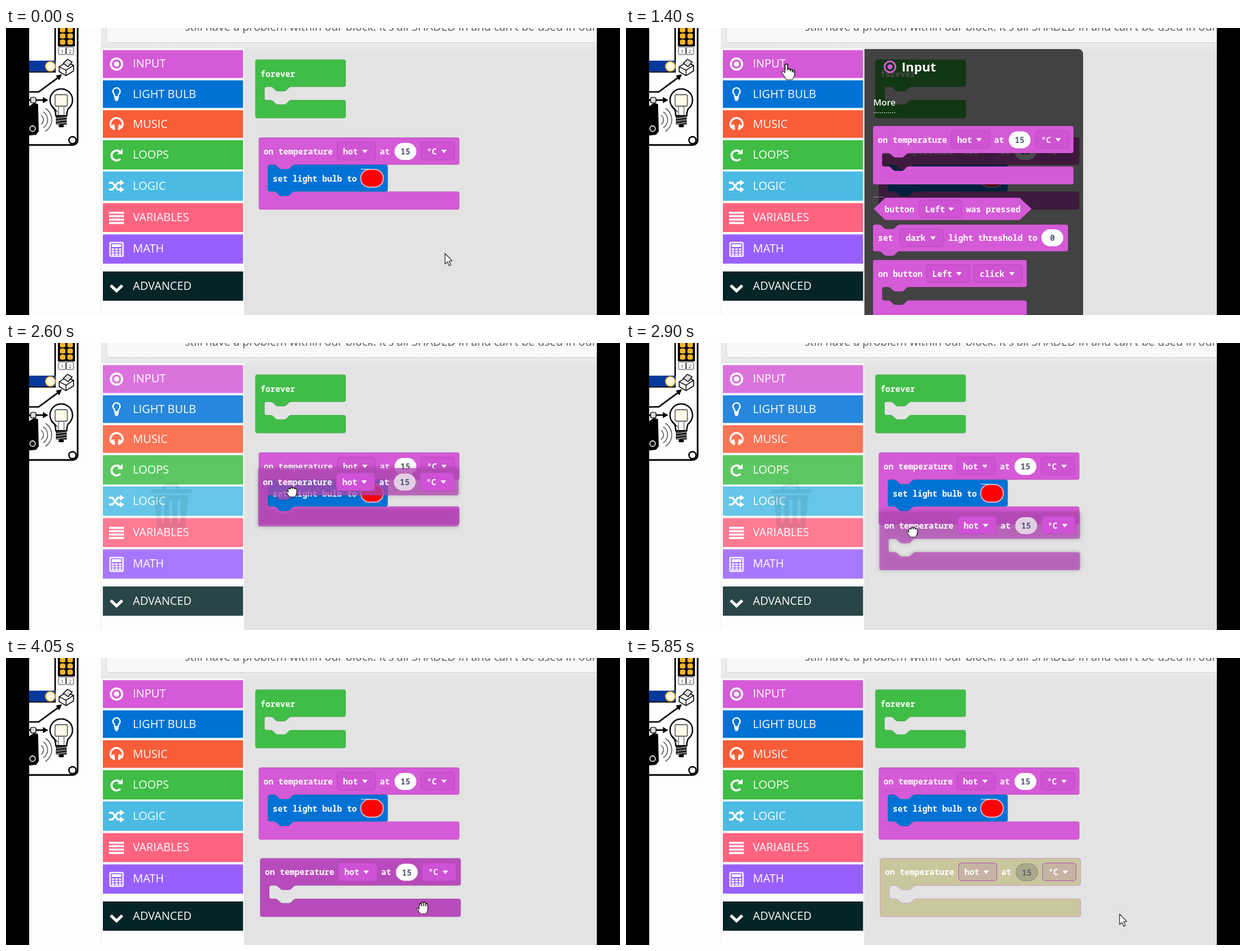
An HTML page with a canvas that plays this animation: 900 by 422 pixels, repeating every 7000 ms.

```html
<!DOCTYPE html>
<html lang="en">
<head>
<meta charset="utf-8">
<title>Block editor</title>
<style>
html, body { margin: 0; width: 100%; height: 100%; overflow: hidden; background: #000; }
canvas { display: block; width: 900px; height: 422px; }
</style>
</head>
<body>
<canvas id="stage" width="900" height="422"></canvas>
<script>
const g = document.getElementById('stage').getContext('2d');
const LOOP = 7000;
const SANS = '"Open Sans", "Noto Sans", sans-serif';
const MONO = 'bold 12.1px "Noto Sans Mono", "DejaVu Sans Mono", monospace';
const PINK = '#d55ad7', BLUE = '#0072d6', GREEN = '#3fbd46', RIM = 'rgba(0,0,0,.1)';

// Looks of an event block: body, field, field border, oval, oval text
const NORMAL = { body: PINK, rim: RIM, field: '#cf53d2', edge: '#bc4bc0', oval: '#fff', num: '#575e75' };
const HELD = { body: '#b84bbb', field: '#cf52d6', edge: '#c04cc6', oval: '#e3cfe4', num: '#575e75' };
const DROPPED = { ...HELD, rim: RIM, oval: '#fff' };
const OFF = { body: '#cac69d', rim: '#d0a9cb', field: '#c6b3a3', edge: '#b964bd', oval: '#aaa98a', num: '#66666c', ovalEdge: '#8f8e78' };

const ROWS = [
  ['INPUT', 32.5, 41, PINK, '#a02fa3'],
  ['LIGHT BULB', 77, 40.5, BLUE, '#004f9c'],
  ['MUSIC', 121, 40.5, '#f95c38', '#b02d15'],
  ['LOOPS', 165, 43, GREEN, '#268a2c'],
  ['LOGIC', 211, 43, '#4bbbe4', '#2390b8'],
  ['VARIABLES', 257.5, 42.5, '#ff6380', '#d02f50'],
  ['MATH', 303.5, 43, '#985fff', '#6a2be0'],
  ['ADVANCED', 358, 43, '#042428', '#021416']
];

// time, pointer kind, x, y
const POINTER = [
  [0, 'arrow', 643, 331], [250, 'arrow', 560, 306], [350, 'arrow', 448, 272], [450, 'arrow', 346, 242],
  [600, 'point', 298, 182], [700, 'point', 247, 117], [800, 'point', 240, 92], [900, 'point', 237, 72],
  [1000, 'point', 235, 60], [1100, 'point', 233, 53], [1850, 'point', 282, 78], [1950, 'point', 345, 116],
  [2050, 'point', 392, 150], [2150, 'grab', 409, 167], [2300, 'fist', 411, 171], [2400, 'fist', 414, 182],
  [2500, 'fist', 417, 199], [2600, 'fist', 419, 218], [2700, 'fist', 419, 239], [2800, 'fist', 419, 259],
  [2900, 'fist', 420, 277], [3000, 'fist', 420, 291], [3100, 'fist', 420, 303], [3200, 'fist', 420, 312],
  [3300, 'fist', 420, 316], [3650, 'grab', 420, 316], [3750, 'grab', 450, 328], [3850, 'grab', 505, 345],
  [3950, 'grab', 560, 358], [4050, 'grab', 611, 368], [4150, 'arrow', 665, 374], [4250, 'arrow', 715, 377],
  [4350, 'arrow', 742, 376], [4550, 'arrow', 738, 376], [4650, 'arrow', 729, 376], [4750, 'arrow', 723, 376]
];
const HOVER = [[0, -1], [600, 3], [700, 2], [800, 1], [900, 0], [1400, -1]];
const DRAG = [[2300, 363, 146], [2400, 365, 155], [2500, 367, 168], [2600, 369.5, 184], [2700, 370.5, 206], [2800, 371, 228],
  [2900, 371.5, 248], [3000, 372, 267], [3100, 372, 280], [3200, 372.5, 290], [3300, 372.5, 294.5]];

const at = (keys, t) => keys.reduce((last, k) => k[0] <= t ? k : last, keys[0]);

function rect(x, y, w, h, fill) { g.fillStyle = fill; g.fillRect(x, y, w, h); }
function paint(fill, edge, width = 1) {
  if (fill) { g.fillStyle = fill; g.fill(); }
  if (edge) { g.strokeStyle = edge; g.lineWidth = width; g.stroke(); }
}
function box(x, y, w, h, r, fill, edge, width) {
  g.beginPath(); g.roundRect(x, y, w, h, r); paint(fill, edge, width);
}
function disc(x, y, r, fill, edge, width) {
  g.beginPath(); g.arc(x, y, r, 0, 7); paint(fill, edge, width);
}
function poly(pts, fill, edge, width, open) {
  g.beginPath();
  for (let i = 0; i < pts.length; i += 2) g.lineTo(pts[i], pts[i + 1]);
  if (!open) g.closePath();
  paint(fill, edge, width);
}
const line = (pts, edge, width) => poly(pts, null, edge, width, true);
function arc(x, y, r, a, b, edge, width) { g.beginPath(); g.arc(x, y, r, a, b); paint(null, edge, width); }
function text(s, x, y, font, fill = '#fff') {
  g.font = font; g.fillStyle = fill; g.textBaseline = 'alphabetic'; g.fillText(s, x, y);
}
const label = (s, x, y, fill) => text(s, x, y, MONO, fill);

// Puzzle tab along a horizontal edge, d is the direction of travel
function notch(x, y, d) {
  g.lineTo(x, y);
  g.bezierCurveTo(x + 2 * d, y, x + 3 * d, y + 1, x + 4 * d, y + 2);
  g.lineTo(x + 7 * d, y + 5);
  g.quadraticCurveTo(x + 8.5 * d, y + 6.5, x + 11 * d, y + 6.5);
  g.lineTo(x + 19 * d, y + 6.5);
  g.quadraticCurveTo(x + 21.5 * d, y + 6.5, x + 23 * d, y + 5);
  g.lineTo(x + 26 * d, y + 2);
  g.bezierCurveTo(x + 27 * d, y + 1, x + 28 * d, y, x + 30 * d, y);
}
function cShape(x, y, w, mouth) {
  const r = x + w, top = y + 40, foot = top + mouth, end = foot + 26.5, m = x + 13.5;
  g.beginPath();
  g.moveTo(x + 3, y);
  g.arcTo(r, y, r, top, 3); g.arcTo(r, top, m, top, 3);
  notch(m + 39, top, -1);
  g.arcTo(m, top, m, foot, 3); g.arcTo(m, foot, r, foot, 3);
  notch(m + 9, foot, 1);
  g.arcTo(r, foot, r, end, 3); g.arcTo(r, end, x, end, 3);
  g.arcTo(x, end, x, y, 3); g.arcTo(x, y, r, y, 3);
  g.closePath();
}
function stackShape(x, y, w) {
  const r = x + w, b = y + 39.5;
  g.beginPath();
  g.moveTo(x, y + 3); g.arcTo(x, y, r, y, 3);
  notch(x + 9, y, 1);
  g.arcTo(r, y, r, b, 3); g.arcTo(r, b, x, b, 3);
  notch(x + 39, b, -1);
  g.arcTo(x, b, x, y, 3);
  g.closePath();
}
function field(s, x, y, w, look = NORMAL) {
  box(x, y, w, 26, 4, look.field, look.edge);
  label(s, x + 8.5, y + 17.5);
  const a = x + w - 15.5, b = y + 11;
  poly([a - 4, b, a + 4, b, a, b + 5], '#fff');
}
function oval(s, x, y, look = NORMAL) {
  box(x, y, 32, 25, 12.5, look.oval, look.ovalEdge);
  label(s, x + 16 - s.length * 3.6, y + 17, look.num);
}
function heatBlock(x, y, look, mouth = 19.5, held) {
  g.save();
  if (held) { g.globalAlpha = .74; g.shadowColor = 'rgba(0,0,0,.3)'; g.shadowBlur = 6; }
  cShape(x, y, 294, mouth);
  paint(look.body);
  g.restore();
  if (look.rim) paint(null, look.rim);
  label('on temperature', x + 7, y + 24.5);
  field('hot', x + 115, y + 7, 56, look);
  label('at', x + 177.5, y + 24.5);
  oval('15', x + 199, y + 8, look);
  field('°C', x + 238, y + 7, 49, look);
}

function icon(i, y) {
  const x = 162, W = '#fff';
  if (i === 0) { disc(x, y, 8.3, null, W, 3); disc(x, y, 3.8, W); }
  if (i === 1) {
    arc(x, y - 4, 5.2, 2.2, 7.2, W, 2);
    line([x - 3, y, x - 2.5, y + 4, x + 2.5, y + 4, x + 3, y], W, 2);
    rect(x - 3, y + 5, 6, 3, W); rect(x - 2, y + 8, 4, 2, W);
  }
  if (i === 2) {
    arc(x, y, 9, 2.5, 6.9, W, 2.8);
    for (const d of [-1, 1]) poly([x + d * 9, y + 5, x + d * 4, y + 9, x + d * 2, y + 8, x + d * 3, y + 1, x + d * 5, y], W);
  }
  if (i === 3) {
    arc(x, y + 1, 7.3, .7, 5.4, W, 3.2);
    poly([x + 9, y - 9, x + 9, y - 1, x + 1, y - 1], W);
  }
  if (i === 4) {
    for (const d of [-1, 1]) {
      line([x - 11, y + 5 * d, x - 6, y + 5 * d, x + 2, y - 5 * d, x + 6, y - 5 * d], W, 2.8);
      poly([x + 5, y - 5 * d - 4.5, x + 11.5, y - 5 * d, x + 5, y - 5 * d + 4.5], W);
    }
  }
  if (i === 5) for (let k = 0; k < 4; k++) rect(x - 11, y - 8.5 + k * 5, 22, 3, W);
  if (i === 6) {
    box(x - 9.5, y - 9.5, 19, 20, 1, null, W, 2);
    rect(x - 7, y - 7, 14, 4, W);
    for (let k = 0; k < 9; k++) rect(x - 7 + k % 3 * 5.2, y - 1 + (k / 3 | 0) * 3.7, 3.6, 2.5, W);
  }
  if (i === 7) line([x - 8.5, y - 1, x, y + 7, x + 8.5, y - 1], W, 4.2);
}
function toolbox(hover, faded) {
  ROWS.forEach(([name, y, h, fill, dark], i) => {
    rect(142, y, 205.5, h, i === hover ? dark : fill);
    if (faded) rect(142, y, 205.5, h, 'rgba(255,255,255,.15)');
    icon(i, y + h / 2);
    text(name, 186, y + h / 2 + 5.3, '500 16.5px ' + SANS);
  });
  if (faded) trash();
}
function trash() {
  const c = 'rgba(35,85,100,.13)';
  line([230, 215, 234, 209, 250, 209, 254, 215], c, 4);
  box(212, 215, 60, 6, 2, c);
  g.beginPath();
  g.moveTo(217, 224); g.lineTo(267, 224); g.lineTo(263, 272); g.lineTo(221, 272); g.closePath();
  for (const x of [227, 239, 251]) g.rect(x, 230, 5, 35);
  g.fillStyle = c; g.fill('evenodd');
}

function board(dim) {
  const K = '#000', gold = dim ? '#c2c2c2' : '#f5b32a', strip = dim ? '#505050' : '#06399c';
  g.save();
  g.beginPath(); g.rect(34, 0, 74, 175); g.clip();
  g.globalAlpha = 1 - dim * .4;
  box(0, -20, 105, 192, 7, '#fff', K, 2.5);
  line([72, 0, 72, 48], K, 2);
  rect(76, 0, 25, 27, K);
  for (let k = 0; k < 6; k++) box(79 + k % 2 * 11, (k / 2 | 0) * 9 - 1, 8, 7.5, 2.5, gold);
  for (const k of [0, 1]) {
    box(77 + k * 11.5, 28, 10.5, 11, 1, '#fff', '#555');
    text(String(k + 1), 80 + k * 11.5, 37, '8px ' + SANS, '#444');
  }
  rect(34, 48, 39, 17, strip);
  rect(34, 64, 39, 1.5, K);
  disc(65, 56.5, 7, '#fff6e2', gold, 1.5);
  // little chip
  poly([78, 57, 89, 50, 99, 55, 99, 63, 88, 70, 78, 64], '#fff', K, 1.4);
  line([78, 57, 88, 62, 99, 55], K, 1.2); line([88, 62, 88, 70], K, 1.2);
  poly([84, 52, 90, 46, 97, 50, 91, 57], '#ddd', K, 1.2);
  // arrows
  line([34, 94, 48, 94, 79, 71], K, 2.2); poly([82, 68, 78, 77, 73, 70], K);
  line([34, 106, 56, 106], K, 2.2); poly([62, 106, 54, 101.5, 54, 110.5], K);
  box(36, 102, 8, 8, 2, '#ddd', K, 1.2);
  // speaker
  poly([34, 115, 41, 110, 47, 112, 48, 152, 44, 157, 34, 158], K);
  arc(39, 148, 4, 0, 7, '#fff', 1.3);
  for (const r of [8, 14, 20]) arc(47, 135, r, -1, 1, '#555', 1.3);
  // lamp
  g.beginPath(); g.arc(81, 106, 16.5, 2.2, 7.22);
  g.quadraticCurveTo(89, 124, 89, 129); g.lineTo(73, 129); g.quadraticCurveTo(73, 124, 71, 119);
  g.closePath(); paint('#fff', K, 2);
  box(72, 98, 18, 17, 2, '#fffbe8', '#555', 1.3);
  line([77, 128, 77, 116], '#555', 1); line([85, 128, 85, 116], '#555', 1);
  rect(73, 129, 16, 13, '#222');
  for (const y of [132, 136, 140]) line([73, y + 1, 89, y - 1], '#bbb', 1);
  box(77, 142, 8, 4, 2, K);
  disc(97.5, 165, 5.2, '#fff', K, 2.2);
  g.restore();
}

function flyout() {
  box(349.5, 31, 320.5, 400, [0, 7, 0, 0], 'rgba(0,0,0,.71)');
  disc(387, 57, 8, null, PINK, 2.6); disc(387, 57, 3.6, PINK);
  text('Input', 404, 63.5, 'bold 18.5px ' + SANS);
  text('More', 362.5, 113.5, '600 13px ' + SANS);
  for (let x = 363; x < 396; x += 3) rect(x, 124, 1.5, 1, '#ddd');
  for (let x = 363; x < 378; x += 3) rect(x, 248, 1.5, 1, '#bbb');
  heatBlock(362, 144, NORMAL);

  poly([363, 266, 380, 249.5, 577, 249.5, 594.5, 266, 577, 282.5, 380, 282.5], PINK, RIM);
  label('button', 379, 270.5);
  field('Left', 430, 253, 62);
  label('was pressed', 498.5, 270.5);

  stackShape(362, 289, 286); paint(PINK, RIM);
  label('set', 369.5, 313);
  field('dark', 401.5, 295.5, 64);
  label('light threshold to', 472.5, 313);
  oval('0', 609, 296);

  cShape(362, 341, 225.5, 19.5); paint(PINK, RIM);
  label('on button', 369.5, 365.5);
  field('Left', 440.5, 348, 63);
  field('click', 510, 348, 71);
}

function pointer(kind, x, y) {
  g.save();
  g.translate(x, y);
  g.lineJoin = 'round';
  if (kind === 'arrow') {
    poly([.5, .5, .5, 16, 4, 12.8, 6.6, 18.6, 9, 17.5, 6.5, 11.8, 11, 11.4], '#fff', '#444', 1.2);
  } else if (kind === 'point') {
    g.beginPath();
    g.roundRect(0, 0, 4, 15, 2); g.roundRect(4, 7, 3.6, 8, 1.8);
    g.roundRect(7.6, 8, 3.6, 8, 1.8); g.roundRect(11, 9, 3.2, 8, 1.6);
    paint('#fff', '#222', 1.6);
    poly([0, 13, -3, 10.5, -5, 12, -1, 18, 2, 23, 11, 23, 14, 17, 14, 12, 1, 11], '#fff', '#222', 1);
    poly([.5, 9, 3.5, 9, 13.5, 13, 13, 17, 10.5, 22, 2.5, 22, -1, 16, .5, 14], '#fff');
  } else {
    const top = kind === 'fist' ? -6 : -9;
    g.beginPath();
    for (let k = 0; k < 4; k++) g.roundRect(-5 + k * 3, top + (k % 3 ? 0 : 2), 3, 10, 1.5);
    paint('#fff', '#222', 1.3);
    poly([-5, 2, -8, -1, -8.5, 1, -3.5, 8, 5, 8, 7, 3, 7, -2, -5, -2], '#fff', '#222', 1);
    poly([-5, -3, 6.5, -3, 6, 4, 4.5, 7.5, -3, 7.5, -5, 4], '#fff');
  }
  g.restore();
}

function page() {
  rect(0, 0, 900, 422, '#fdfdfd');
  const shade = g.createLinearGradient(0, 20, 0, 36);
  shade.addColorStop(0, '#ececec');
  shade.addColorStop(1, '#e3e3e3');
  rect(139, 0, 727, 30, shade);
  rect(139, 30, 1, 392, '#ececec');
  box(147, -20, 760, 41.5, 5, '#f8f8f9', '#d4d4d4');
  text("still have a problem within our block. It's all SHADED in and can't be used in our",
    262, 4, '16.4px ' + SANS, '#55585c');
  rect(349, 24, 517, 398, shade);
}
function workspace() {
  cShape(365.5, 46.5, 132.5, 19.5); paint(GREEN, RIM);
  label('forever', 373, 71.5);
  heatBlock(370.5, 161, NORMAL, 39.5);
  stackShape(384, 201, 175.5); paint(BLUE, RIM);
  label('set light bulb to', 391, 225.5);
  box(520, 208, 33, 26, 12.5, '#f00', '#e9c3cd', 1.4);
  line([520, 207.5, 534, 207.5], '#cfd6e6', 1);
}

function draw(t) {
  const held = t >= 2300 && t < 3650;
  page();
  board(t < 4250 || t >= 5850 ? 0 : t < 5750 ? 1 : .5);
  toolbox(at(HOVER, t)[1], held);
  workspace();
  if (t >= 1400 && t < 2300) flyout();
  if (t >= 2300) {
    const [, x, y] = at(DRAG, t);
    heatBlock(x, y, held ? HELD : t < 4250 ? DROPPED : OFF, 19.5, held);
  }
  const [, kind, x, y] = at(POINTER, t);
  pointer(kind, x, y);
  rect(0, 0, 34, 422, '#000');
  rect(866, 0, 34, 422, '#000');
}

const start = performance.now();
function tick() {
  draw((performance.now() - start) % LOOP);
  requestAnimationFrame(tick);
}
tick();
</script>
</body>
</html>
```
